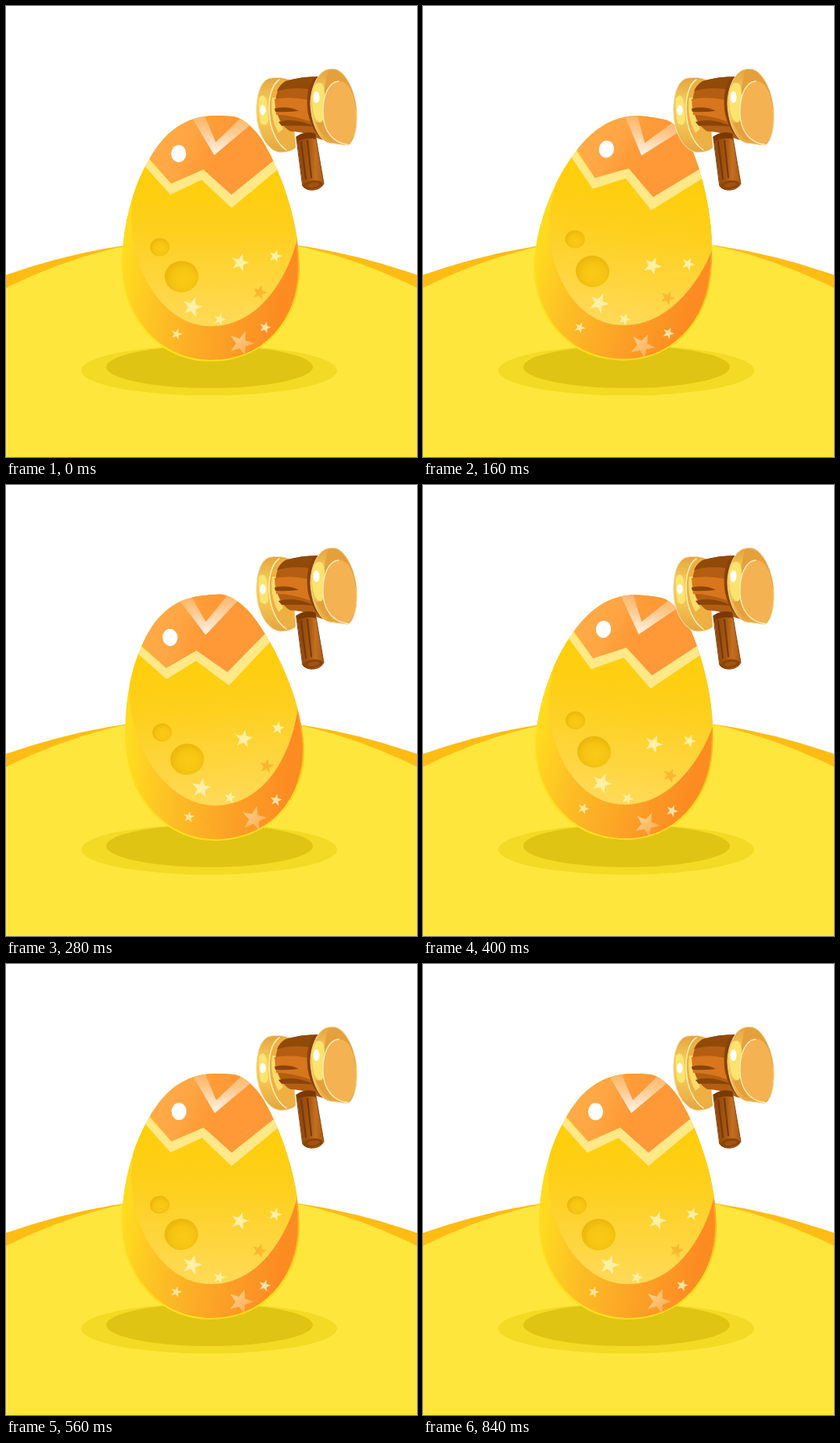
An HTML page for the animation above (1.48 s loop, 525 by 576 pixels).

```html
<!DOCTYPE html>
<html lang="en">
<head>
<meta charset="utf-8">
<title>Wobbling golden egg</title>
<style>
html, body { margin: 0; width: 100%; height: 100%; overflow: hidden; background: #fff; }
svg { display: block; width: 100%; height: 100%; }
</style>
</head>
<body>
<svg viewBox="0 0 525 576" xmlns="http://www.w3.org/2000/svg">
  <defs>
    <path id="shell" d="M268 140C228 140 202 162 183 195.5C161 232 148 284 148 329C148 398 194 454 262 454C330 454 375 402 375 336C375 280 353 213 327 171C318 157 303 143 290 141Q279 140 268 140Z"/>
    <clipPath id="shellClip"><use href="#shell"/></clipPath>
    <linearGradient id="under" gradientUnits="userSpaceOnUse" x1="148" y1="350" x2="350" y2="385">
      <stop offset="0" stop-color="#ffda20"/><stop offset=".3" stop-color="#fcbd25"/>
      <stop offset=".65" stop-color="#fca226"/><stop offset="1" stop-color="#fc8c22"/>
    </linearGradient>
    <linearGradient id="body" gradientUnits="userSpaceOnUse" x1="0" y1="215" x2="0" y2="409">
      <stop offset="0" stop-color="#ffce0b"/><stop offset=".35" stop-color="#fecf1c"/>
      <stop offset="1" stop-color="#ffda58"/>
    </linearGradient>
    <linearGradient id="cap" gradientUnits="userSpaceOnUse" x1="190" y1="175" x2="275" y2="205">
      <stop offset="0" stop-color="#ffab48"/><stop offset=".45" stop-color="#ffa543"/>
      <stop offset=".7" stop-color="#ff9c38"/><stop offset="1" stop-color="#ff9836"/>
    </linearGradient>
    <linearGradient id="chevron" gradientUnits="userSpaceOnUse" x1="0" y1="142" x2="0" y2="191">
      <stop offset="0" stop-color="#ffb766"/><stop offset=".4" stop-color="#ffcb92"/>
      <stop offset="1" stop-color="#fff6ec"/>
    </linearGradient>
    <linearGradient id="rim" gradientUnits="userSpaceOnUse" x1="0" y1="270" x2="0" y2="400">
      <stop offset="0" stop-color="#ffe01c" stop-opacity="0"/><stop offset="1" stop-color="#ffe01c"/>
    </linearGradient>
    <radialGradient id="crater" cx=".55" cy=".58" r=".55">
      <stop offset="0" stop-color="#f9ca17"/><stop offset=".6" stop-color="#f6c512"/>
      <stop offset="1" stop-color="#ecb70c"/>
    </radialGradient>
    <linearGradient id="bigStar" x1="0" y1="0" x2="1" y2="1">
      <stop offset="0" stop-color="#ffdca0" stop-opacity=".9"/>
      <stop offset="1" stop-color="#ffc080" stop-opacity=".45"/>
    </linearGradient>
    <linearGradient id="grip" x1="0" y1="0" x2="1" y2="0">
      <stop offset="0" stop-color="#8a4308"/><stop offset=".45" stop-color="#a5560f"/>
      <stop offset=".7" stop-color="#c47022"/><stop offset="1" stop-color="#a9580f"/>
    </linearGradient>
    <linearGradient id="band" x1="0" y1="0" x2="0" y2="1">
      <stop offset="0" stop-color="#e5a340"/><stop offset=".3" stop-color="#f4c956"/>
      <stop offset=".6" stop-color="#f5c653"/><stop offset="1" stop-color="#e5a540"/>
    </linearGradient>
  </defs>

  <path d="M0 343.5Q262.5 251.5 525 343.5V400H0Z" fill="#ffbc14"/>
  <path d="M0 360Q262.5 230 525 360V576H0Z" fill="#ffe63c"/>
  <ellipse cx="259.5" cy="465.5" rx="163.5" ry="32" fill="#f3da25"/>
  <ellipse cx="260" cy="461" rx="132" ry="27" fill="#e0c413"/>

  <g id="egg">
    <g clip-path="url(#shellClip)">
      <use href="#shell" fill="url(#under)"/>
      <path d="M140 130H385V270L372 297C362 340 327 409 262 409C204 409 160 342 160 270L162 244L140 240Z" fill="url(#body)"/>
      <path d="M150 130H370V185L342 200L288 242L252 209L211 227L176 186Z" fill="url(#cap)"/>
      <path d="M236 140L253 139L268 174L301 142L313 151L266 190.5Z" fill="url(#chevron)"/>
      <path d="M172 184L211 227L252 209L288 241L350 191L360 198L288 258L250 222L210 241L165 191Z" fill="#ffe888"/>
      <use href="#shell" fill="none" stroke="url(#rim)" stroke-width="4"/>
    </g>
    <ellipse cx="220.5" cy="188.5" rx="9.6" ry="11" fill="#fff"/>
    <ellipse cx="196.5" cy="308" rx="12.5" ry="11.5" fill="url(#crater)"/>
    <ellipse cx="224.3" cy="345.5" rx="21.5" ry="20" fill="url(#crater)"/>
    <g id="stars"></g>
  </g>

  <g id="hammer" stroke-linejoin="round" stroke-linecap="round">
    <!-- far band -->
    <path d="M338 92C325 94 319 115 320 138C321 163 334 185 350 187C358 187 366 185 370 181L362 94Q350 90 338 92Z" fill="url(#band)" stroke="#f7e3bb"/>
    <path d="M349 94C330 106 331 166 358 184L370 180L362 94Z" fill="#eeb043"/>
    <path d="M349 94C330 106 331 166 358 184" fill="none" stroke="#fff0b5" stroke-width="1.5"/>
    <path d="M323 118Q329 109 333 121L335 146Q332 156 325 149Q322 133 323 118Z" fill="#fbe571"/>
    <path d="M340 117Q337 143 348 162L354 157Q344 138 345 117Z" fill="#f9dc6a"/>
    <ellipse cx="328" cy="133" rx="3.8" ry="6.5" fill="#fff"/>
    <!-- barrel -->
    <path d="M357 96Q376 90 401 90L411 172Q400 171 392 166Q376 160 363 160C345 150 335 112 357 96Z" fill="#b35e12"/>
    <path d="M357 96Q376 90 400 90L392 107Q366 102 346 109Q349 101 357 96Z" fill="#914a08"/>
    <path d="M343 119Q364 115 386 120Q383 138 390 148Q366 139 345 139Z" fill="#d8761d"/>
    <path d="M343 131Q360 127 374 134Q358 136 344 135ZM348 148Q370 142 394 154Q372 152 352 153Z" fill="#8a4407"/>
    <path d="M394 91C379 108 382 152 403 169L411 172L401 90Z" fill="#8a4305"/>
    <!-- handle -->
    <path d="M371 167Q382 159 395 163L406 227Q402 234 393 235Q384 236 379 230Z" fill="url(#grip)" stroke="#8a4a17"/>
    <path d="M371 167Q382 159 395 163L396 170Q383 167 372 173Z" fill="#7b3a05"/>
    <path d="M377 174L383 221M385 172L390 219" fill="none" stroke="#75360a" stroke-width="2"/>
    <ellipse cx="392" cy="228.5" rx="12.5" ry="5.5" transform="rotate(-8 392 228.5)" fill="#8a4409"/>
    <ellipse cx="393" cy="228.5" rx="8" ry="3" transform="rotate(-8 393 228.5)" fill="#a2520f"/>
    <!-- near band and face -->
    <path d="M411 81C397 84 389 107 389 125C390 150 400 172 413 175L437 178C446 172 449 152 448 135C446 108 434 83 420 80.5Q415 80 411 81Z" fill="url(#band)" stroke="#f3d9a4"/>
    <path d="M412 82C426 78 445 97 448 135C440 104 432 95 424 96C405 100 400 150 418 174C406 169 399 158 395 147C409 160 402 106 412 82Z" fill="#e5a03c"/>
    <path d="M396 99Q407 94 407 114L405 145Q402 153 395 143C389 127 390 108 396 99Z" fill="#fbe36e"/>
    <ellipse cx="396.5" cy="116.5" rx="4" ry="7.5" fill="#fff"/>
    <path d="M425 96C411 97 404 117 405 139C406 160 418 176 435 177C444 173 448 155 447 137C446 112 437 95 425 96Z" fill="#f4b253"/>
    <path d="M425 96C411 97 404 117 405 139C406 160 418 175 437 177" fill="none" stroke="#fff0bc" stroke-width="1.3"/>
  </g>
</svg>
<script>
const STEP = 40, LOOP = 1480, SWING = 120;
const PEAKS = [0, 14.5, -12, 9.6, -5.7, 2.3, -2, 0];
const PIVOT = "268.5 286";
const egg = document.getElementById("egg");

// x, y, radius, tilt, fill
const STARS = [
  [299, 328, 12, 16, "#fff0a6"],
  [344, 319.5, 8.8, 16, "#fff0a6"],
  [324, 366, 9.8, 16, "#fcb72f"],
  [238, 384.5, 13.3, 16, "#fff0a6"],
  [273, 400.5, 8, 16, "#fff0a6"],
  [218, 419, 7.5, 16, "#ffe69a"],
  [331, 410.5, 8, 16, "#ffe0a8"],
  [300.5, 431, 16.5, 18, "url(#bigStar)"]
];

function starPoints(x, y, r, tilt) {
  return Array.from({ length: 10 }, (_, i) => {
    const a = (tilt + i * 36 - 90) * Math.PI / 180;
    const d = i % 2 ? r * 0.4 : r;
    return (x + d * Math.cos(a)).toFixed(2) + "," + (y + d * Math.sin(a)).toFixed(2);
  }).join(" ");
}

document.getElementById("stars").innerHTML = STARS.map(([x, y, r, tilt, fill]) =>
  `<polygon points="${starPoints(x, y, r, tilt)}" fill="${fill}"/>`).join("");

// Eased swings between shrinking peaks, then rest.
function angleAt(t) {
  const i = Math.floor(t / SWING);
  if (i >= PEAKS.length - 1) return 0;
  const ease = (1 - Math.cos(Math.PI * (t / SWING - i))) / 2;
  return PEAKS[i] + (PEAKS[i + 1] - PEAKS[i]) * ease;
}

function draw(now) {
  const t = Math.floor((now % LOOP) / STEP) * STEP;
  egg.setAttribute("transform", `rotate(${angleAt(t).toFixed(3)} ${PIVOT})`);
}

const start = performance.now();
function tick() {
  draw(performance.now() - start);
  requestAnimationFrame(tick);
}
tick();
</script>
</body>
</html>
```
